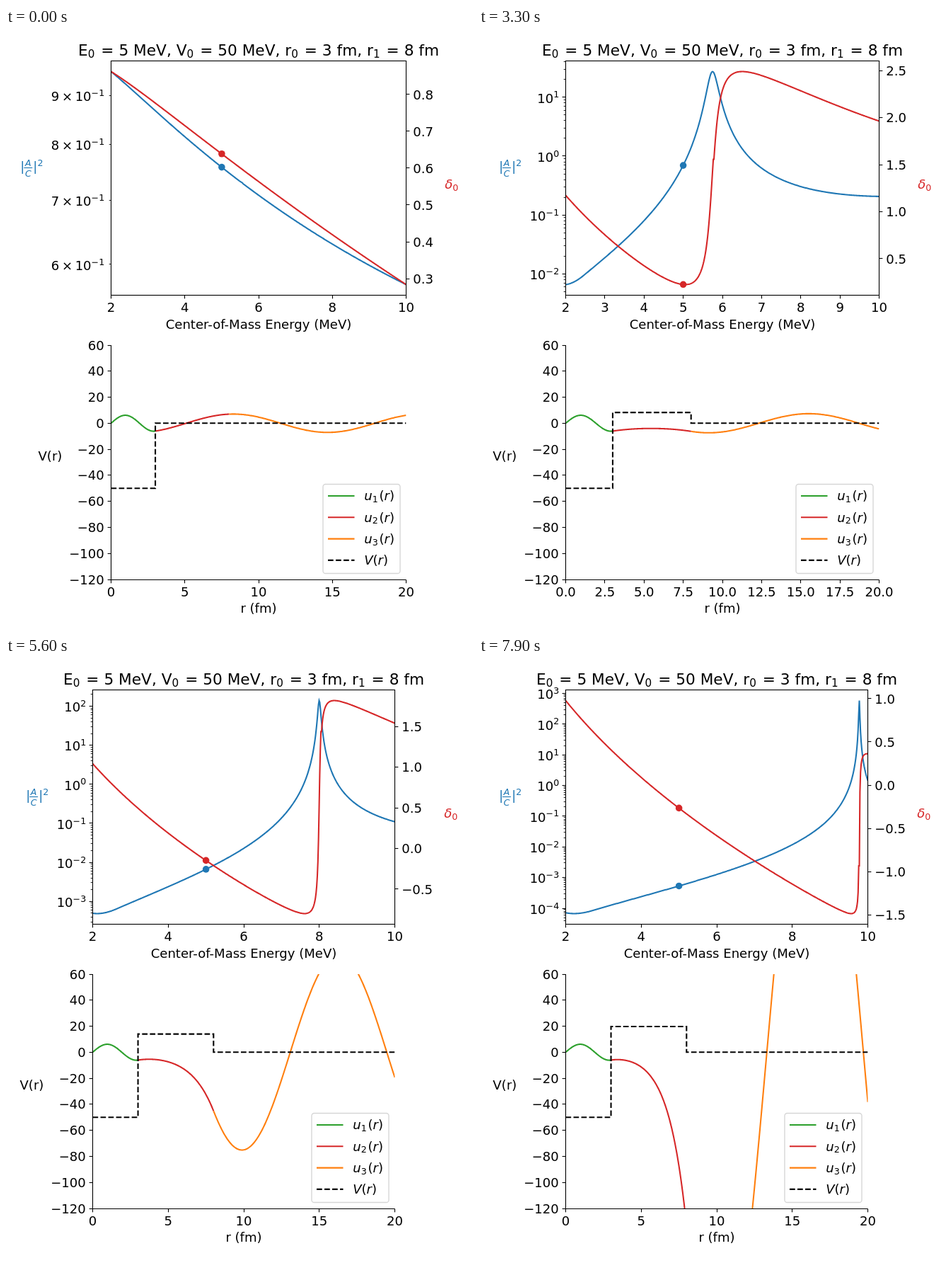
Write an HTML page with a canvas that moves like this. It is 660x849 px and loops after 8 s.

```html
<!DOCTYPE html>
<html lang="en">
<head>
<meta charset="utf-8">
<title>Scattering from a well and barrier</title>
<style>
html, body { margin: 0; width: 100%; height: 100%; overflow: hidden; background: #fff; }
canvas { display: block; }
</style>
</head>
<body>
<canvas id="stage" width="660" height="849"></canvas>
<script>
const ctx = document.getElementById('stage').getContext('2d');
const BLUE = '#1f77b4', RED = '#d62728', GREEN = '#2ca02c', ORANGE = '#ff7f0e', BLACK = '#000';
const SIZE = 18.06, LINE = 2.08, DASH = [7.7, 3.33];
const TOP = 46.5, BOTTOM = 377.5, V_TOP = 448, V_BOTTOM = 779.5;
const MASS = 2 * 938.272 / 197 ** 2;
const V0 = 50, R0 = 3, R1 = 8, R_MAX = 20, ENERGY = 5, SAMPLES = 500;
const energies = Array.from({ length: SAMPLES }, (_, i) => 2 + 8 * i / (SAMPLES - 1));
const dotIndex = Math.round(3 / 8 * (SAMPLES - 1));

// ---- physics ----

// Carry [u, u'] over a distance d where u'' = -w u
function carry([u, du], w, d) {
  const q = Math.sqrt(Math.abs(w));
  const c = w > 0 ? Math.cos(q * d) : Math.cosh(q * d);
  const s = q === 0 ? d : (w > 0 ? Math.sin(q * d) : Math.sinh(q * d)) / q;
  return [u * c + du * s, du * c - w * u * s];
}

function wave(E, barrier) {
  const inner = r => carry([0, 10], MASS * (E + V0), r);
  const middle = r => carry(inner(R0), MASS * (E - barrier), r - R0);
  const outer = r => carry(middle(R1), MASS * E, r - R1);
  return { inner, middle, outer };
}

// Highest value of sin between two angles
function maxSine(from, to) {
  const crest = Math.PI / 2 + 2 * Math.PI * Math.ceil((from - Math.PI / 2) / (2 * Math.PI));
  return crest <= to ? 1 : Math.max(Math.sin(from), Math.sin(to));
}

// C is the highest value the outer wave reaches inside the plotted range
function scatter(E, barrier) {
  const [u, du] = wave(E, barrier).middle(R1);
  const k = Math.sqrt(MASS * E), phase = Math.atan2(k * u, du);
  const A = 10 / Math.sqrt(MASS * (E + V0));
  const C = Math.hypot(u, du / k) * maxSine(phase, phase + k * (R_MAX - R1));
  return { ratio: (A / C) ** 2, shift: Math.atan(Math.tan(phase - k * R1)) };
}

// Close every jump larger than one radian
function joinJumps(list) {
  let offset = 0;
  return list.map((v, i) => {
    if (i && Math.abs(v - list[i - 1]) > 1) offset += list[i - 1] - v;
    return v + offset;
  });
}

// ---- axis helpers ----

function limits(list) {
  const lo = Math.min(...list), hi = Math.max(...list), pad = (hi - lo) * 0.05;
  return [lo - pad, hi + pad];
}

function linearTicks([lo, hi], bins) {
  const raw = (hi - lo) / bins, unit = 10 ** Math.floor(Math.log10(raw));
  const step = unit * [1, 2, 2.5, 5, 10].find(s => s * unit >= raw * 0.999999);
  const digits = [0, 1, 2, 3].find(d => Math.abs(step * 10 ** d - Math.round(step * 10 ** d)) < 1e-6);
  const ticks = [];
  for (let n = Math.ceil(lo / step - 1e-9); n * step <= hi + 1e-9; n++) {
    ticks.push({ v: n * step, label: minus((n * step).toFixed(digits)) });
  }
  return ticks;
}

function logTicks([lo, hi]) {
  const span = hi - lo, ticks = [];
  const labelled = span > 1 ? [1] : span > 0.4 ? [1, 2, 3, 4, 6] : [1, 2, 3, 4, 5, 6, 7, 8, 9];
  for (let e = Math.floor(lo); e <= hi; e++) {
    for (let m = 1; m < 10; m++) {
      const v = e + Math.log10(m);
      if (v < lo || v > hi) continue;
      const power = ['10', '^' + minus(String(e))];
      const label = m === 1 ? power : [m + '\u2009×\u2009', ...power];
      ticks.push({ v, major: m === 1, label: labelled.includes(m) ? label : null });
    }
  }
  return ticks;
}

const minus = s => s.replace('-', '−');
const snap = v => Math.floor(v) + 0.5;

// ---- drawing helpers ----

// Parts starting with _ are subscripts, ^ superscripts, / italics
function setPart(part, size) {
  const mark = '_^/'.includes(part[0]) ? part[0] : '';
  const small = mark === '_' || mark === '^';
  ctx.font = `${mark === '/' ? 'italic ' : ''}${small ? size * 0.7 : size}px "DejaVu Sans", sans-serif`;
  const text = mark ? part.slice(1) : part;
  const dy = mark === '_' ? size * 0.16 : mark === '^' ? -size * 0.4 : 0;
  return { text, dy, width: ctx.measureText(text).width + (mark === '_' ? size * 0.1 : 0) };
}

const widthOf = (parts, size = SIZE) =>
  [].concat(parts).reduce((sum, p) => sum + setPart(p, size).width, 0);

// align: 0 left, 0.5 centre, 1 right
function write(parts, x, y, align = 0, color = BLACK, size = SIZE) {
  x -= widthOf(parts, size) * align;
  ctx.fillStyle = color;
  for (const part of [].concat(parts)) {
    const p = setPart(part, size);
    ctx.fillText(p.text, x, y + p.dy);
    x += p.width;
  }
}

function path(points, color, width = LINE, dash = []) {
  ctx.beginPath();
  points.forEach(([x, y]) => ctx.lineTo(x, y));
  ctx.strokeStyle = color;
  ctx.lineWidth = width;
  ctx.setLineDash(dash);
  ctx.stroke();
  ctx.setLineDash([]);
}

const rule = (x1, y1, x2, y2, width = 1.11) => path([[x1, y1], [x2, y2]], BLACK, width);

function dot(x, y, color) {
  ctx.beginPath();
  ctx.arc(x, y, 4.8, 0, 7);
  ctx.fillStyle = color;
  ctx.fill();
}

function clipped(x, y, w, h, draw) {
  ctx.save();
  ctx.beginPath();
  ctx.rect(x, y, w, h);
  ctx.clip();
  draw();
  ctx.restore();
}

function xTicks(range, bins, toX, y) {
  for (const { v, label } of linearTicks(range, bins)) {
    const x = snap(toX(v));
    rule(x, y, x, y + 4.86);
    write(label, toX(v), y + 23.6, 0.5);
  }
}

function ratioLabel(x) {
  write('|', x, 202, 0, BLUE);
  write('/A', x + 11, 194.5, 0.5, BLUE, SIZE * 0.7);
  write('/C', x + 11, 210, 0.5, BLUE, SIZE * 0.7);
  path([[x + 5, 197.5], [x + 17, 197.5]], BLUE, 1.1);
  write(['|', '^2'], x + 18, 202, 0, BLUE);
}

function legend(right) {
  const x = right - 117.5;
  ctx.beginPath();
  ctx.roundRect(x, 644.5, 109, 126, 3.6);
  ctx.fillStyle = 'rgba(255,255,255,.8)';
  ctx.fill();
  ctx.strokeStyle = 'rgba(204,204,204,.8)';
  ctx.lineWidth = 1.39;
  ctx.stroke();
  const rows = [
    [GREEN, ['/u', '_1']], [RED, ['/u', '_2']], [ORANGE, ['/u', '_3']], [BLACK, ['/V']]
  ];
  rows.forEach(([color, name], i) => {
    const y = 661 + i * 30.3;
    path([[x + 7, y], [x + 44.5, y]], color, LINE, color === BLACK ? DASH : []);
    write([...name, '(', '/r', ')'], x + 58.2, y + 6.3);
  });
}

// ---- picture ----

function upperPlot(logs, shifts, left, right, bins) {
  const toX = e => left + (e - 2) / 8 * (right - left);
  const scale = ([lo, hi]) => v => BOTTOM - (v - lo) / (hi - lo) * (BOTTOM - TOP);
  const logRange = limits(logs), shiftRange = limits(shifts);
  const logY = scale(logRange), shiftY = scale(shiftRange);

  let logWidth = 0, shiftWidth = 0;
  for (const { v, major, label } of logTicks(logRange)) {
    const y = snap(logY(v));
    rule(left, y, left - (major ? 4.86 : 2.78), y, major ? 1.11 : 0.83);
    if (!label) continue;
    write(label, left - 9.3, logY(v) + 7.8, 1);
    logWidth = Math.max(logWidth, widthOf(label));
  }
  for (const { v, label } of linearTicks(shiftRange, 9)) {
    const y = snap(shiftY(v));
    rule(right, y, right + 4.86, y);
    write(label, right + 9.7, shiftY(v) + 6.8);
    shiftWidth = Math.max(shiftWidth, widthOf(label));
  }
  xTicks([2, 10], bins, toX, BOTTOM);

  const curves = [[logs, logY, BLUE], [shifts, shiftY, RED]];
  clipped(left, TOP, right - left, BOTTOM - TOP, () => {
    for (const [list, toY, color] of curves) {
      path(list.map((v, i) => [toX(energies[i]), toY(v)]), color);
      dot(toX(ENERGY), toY(list[dotIndex]), color);
    }
  });
  ctx.strokeStyle = BLACK;
  ctx.lineWidth = 1.11;
  ctx.strokeRect(left, TOP, right - left, BOTTOM - TOP);

  const middle = (left + right) / 2;
  write(['E', '_0', ' = 5 MeV, V', '_0', ' = 50 MeV, r', '_0', ' = 3 fm, r', '_1', ' = 8 fm'],
    middle, 39, 0.5, BLACK, SIZE * 1.2);
  write('Center-of-Mass Energy (MeV)', middle, 425, 0.5);
  ratioLabel(left - 52.8 - logWidth);
  write(['/δ', '_0'], right + 26 + shiftWidth, 227, 0, RED);
}

function lowerPlot(barrier, left, right, bins) {
  const toX = r => left + r / R_MAX * (right - left);
  const toY = v => V_TOP + (60 - v) / 180 * (V_BOTTOM - V_TOP - 0.5);
  const { inner, middle, outer } = wave(ENERGY, barrier);
  const curves = [[inner, 0, R0, GREEN], [middle, R0, R1, RED], [outer, R1, R_MAX, ORANGE]];

  clipped(left, V_TOP, right - left, V_BOTTOM - V_TOP, () => {
    for (const [u, from, to, color] of curves) {
      const points = Array.from({ length: 201 }, (_, i) => {
        const r = from + (to - from) * i / 200;
        return [toX(r), toY(u(r)[0])];
      });
      path(points, color);
    }
    const steps = [[0, -V0], [R0, -V0], [R0, barrier], [R1, barrier], [R1, 0], [R_MAX, 0]];
    path(steps.map(([r, v]) => [toX(r), toY(v)]), BLACK, LINE, DASH);
  });

  rule(left, V_TOP, left, V_BOTTOM);
  rule(left, V_BOTTOM, right, V_BOTTOM);
  for (const { v, label } of linearTicks([-120, 60], 9)) {
    const y = snap(toY(v));
    rule(left, y, left - 4.86, y);
    write(label, left - 9.7, toY(v) + 6.6, 1);
  }
  xTicks([0, R_MAX], bins, toX, V_BOTTOM);
  write('r (fm)', (left + right) / 2, 825.5, 0.5);
  write('V(r)', left - 103, 610.5);
  legend(right);
}

function draw(index) {
  const barrier = index * 0.25;
  const results = energies.map(E => scatter(E, barrier));
  const logs = results.map(p => Math.log10(p.ratio));
  const shifts = joinJumps(results.map(p => p.shift));

  // Margins follow the widest tick labels; the right one is fitted with a coarser scale
  const widest = ticks => Math.max(0, ...ticks.map(t => t.label ? widthOf(t.label) : 0));
  const left = snap(Math.max(122.8, 73.2 + widest(logTicks(limits(logs)))));
  const right = snap(593.75 - widest(linearTicks(limits(shifts), 8)));
  const bins = Math.min(9, Math.floor((right - left) / (3 * SIZE)));

  ctx.fillStyle = '#fff';
  ctx.fillRect(0, 0, 660, 849);
  upperPlot(logs, shifts, left, right, bins);
  lowerPlot(barrier, left, right, bins);
}

let shown = -1;
function tick() {
  const index = Math.floor(performance.now() / 100) % 80;
  if (index !== shown) draw(shown = index);
  requestAnimationFrame(tick);
}
tick();
</script>
</body>
</html>
```
